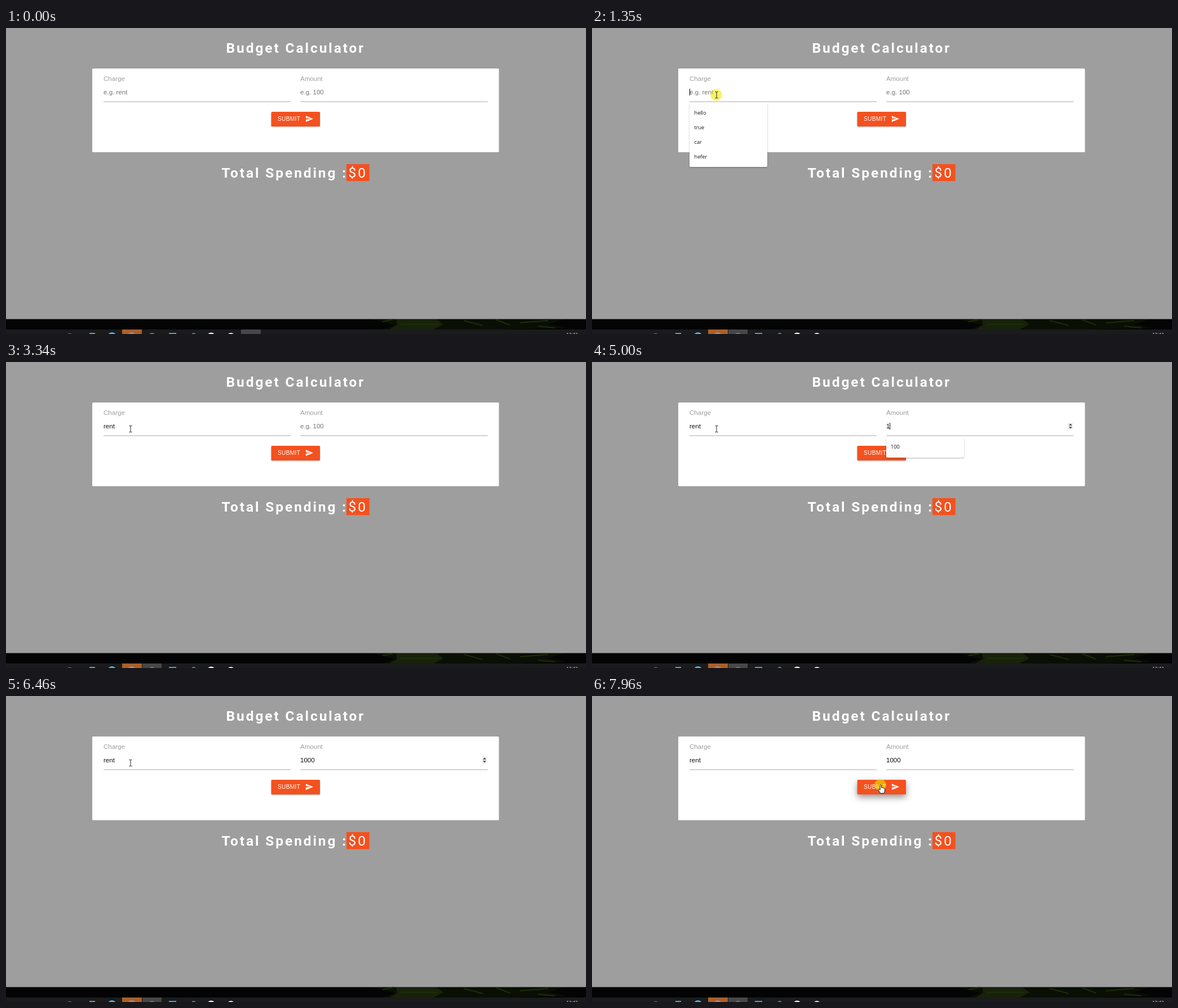
Recreate the animation shown at these times as an HTML page. Size 1029x544 px, loop 8000 ms.

```html
<!DOCTYPE html>
<html lang="en">
<head>
<meta charset="utf-8">
<title>Budget Calculator</title>
<style>
html, body { margin: 0; width: 100%; height: 100%; overflow: hidden; background: #9e9e9e; }
svg { display: block; width: 100%; height: 100%; }
text { font: 11.56px "Liberation Sans", Arial, sans-serif; white-space: pre; }
.head { font: 700 24.5px Roboto, sans-serif; letter-spacing: 2.89px; fill: #fff; }
.sum { font-weight: 400; }
.label { fill: #9e9e9e; }
.btn { font-size: 10.1px; letter-spacing: .36px; fill: #fff; }
.menu text { font: 9.1px "Open Sans", "Noto Sans", sans-serif; fill: #111; }
.menu rect { fill: #fff; filter: drop-shadow(0 1px 1px rgba(0,0,0,.3)); }
.clock { font: 8px "Open Sans", sans-serif; fill: #fff; }
</style>
</head>
<body>
<svg viewBox="0 0 1029 544">
  <rect width="1029" height="544" fill="#9e9e9e"/>

  <!-- desktop strip and taskbar -->
  <rect y="517.5" width="1029" height="27" fill="#040404"/>
  <path d="M650 518H990L960 527 996 533 880 536H668L690 528Z" fill="#0a0f05"/>
  <path d="M692 518H764L776 527 758 536H680L694 528Z" fill="#18220b"/>
  <path d="M668 522l20-4M700 527h66M812 520l34 9M868 518l26 10M912 524l50-4M944 530l30 3" stroke="#1d2c0a" stroke-width="2"/>
  <rect y="536" width="1029" height="8" fill="#1a1b1d"/>
  <rect x="206" y="536" width="35" height="8" fill="#ad5f28"/>
  <rect id="tabA" x="417" y="536" width="35" height="8" fill="#464748"/>
  <rect id="tabB" x="242" y="536" width="34" height="8" fill="#464748"/>
  <circle cx="113" cy="549" r="6.5" fill="#5d6a62"/>
  <rect x="148" y="542" width="10" height="2" fill="#4aa3d8"/>
  <circle cx="188" cy="549" r="8" fill="#4ab4e0"/>
  <circle cx="223" cy="549" r="8" fill="#8d8f9c"/>
  <circle cx="259" cy="549" r="7" fill="#a9683c"/>
  <rect x="289" y="542" width="13" height="2" fill="#3fa0e0"/>
  <circle cx="333" cy="546" r="4" fill="#3c8fc4"/>
  <circle cx="364" cy="549" r="7.5" fill="#eee"/>
  <circle cx="399" cy="549" r="7" fill="#eee"/>
  <text class="clock" x="994" y="546.5">12:42</text>

  <!-- page -->
  <text class="head" x="390.6" y="44">Budget Calculator</text>
  <rect x="153" y="72" width="721.5" height="148.7" rx="1.5" fill="#fff"/>
  <text class="label" x="173" y="94">Charge</text>
  <text class="label" x="522" y="94">Amount</text>
  <path d="M173 131H505M522.4 131H854.5" stroke="#9e9e9e" stroke-width=".9"/>
  <text id="charge" x="173" y="118"></text>
  <text id="amount" x="522" y="118"></text>
  <g id="spin">
    <rect x="844.5" y="108" width="8.5" height="12" fill="#eee"/>
    <path d="M846 112.7l2.9-3.2 2.9 3.2zM846 115.3l2.9 3.2 2.9-3.2z" fill="#444"/>
  </g>
  <rect id="caret" y="108" width="1" height="12"/>
  <rect id="button" x="470.6" y="149" width="86.4" height="26" rx="1.5" fill="#f4511e"/>
  <text class="btn" x="482" y="165.3">SUBMIT</text>
  <path transform="translate(530.7 154.1) scale(.62)" d="M2 21L23 12 2 3v7l15 2-15 2z" fill="#fff"/>
  <text class="head" x="382.5" y="266">Total Spending :</text>
  <rect x="604" y="242" width="40.7" height="30.2" fill="#f4511e"/>
  <text class="head sum" x="607.6" y="266">$0</text>

  <g id="menuA" class="menu">
    <rect x="173" y="134" width="138" height="113" rx="2"/>
    <text x="181.6" y="154.4">hello</text>
    <text x="181.6" y="180.3">true</text>
    <text x="181.6" y="206.2">car</text>
    <text x="181.6" y="232.1">hefer</text>
  </g>
  <g id="menuB" class="menu">
    <rect x="522" y="134" width="138" height="36" rx="2"/>
    <text x="530" y="154.4">100</text>
  </g>

  <!-- pointer -->
  <circle id="halo" r="10.3" fill="#f2e800" opacity=".58"/>
  <path id="arrow" d="M0 0V12.2L2.8 9.6 4.6 13.7 6.5 12.9 4.7 8.9H8.5Z" fill="#fff" stroke="#000" stroke-width=".8"/>
  <path id="beam" d="M-2.6-5.6H-.9L0-4.9 .9-5.6H2.6M0-4.9V4.9M-2.6 5.6H-.9L0 4.9 .9 5.6H2.6" fill="none" stroke="#222" stroke-width="1"/>
  <path id="hand" d="M-.9 .4Q.3-1 1.5 .4V4.9Q2.8 4 3.7 5.2 5 4.6 5.7 5.9 7.4 5.6 7.4 7.4V11L6 15H-.2L-4 9.6Q-4.6 7.6-2.6 7.9L-.9 9.3Z" fill="#fff" stroke="#000" stroke-width=".9"/>
</svg>
<script>
const LOOP = 8000, EM = 11.56;
const $ = id => document.getElementById(id);
const show = (id, on) => $(id).style.display = on ? "" : "none";
const clamp = v => Math.min(1, Math.max(0, v));
const within = (t, ...spans) => spans.some(([a, b]) => t >= a && t < b);
const glyph = { r: .333, e: .556, n: .556, t: .278 };
const widthOf = s => [...s].reduce((w, c) => w + (glyph[c] || .556) * EM, 0);

// number of keys pressed so far
const typed = (word, times, t) => word.slice(0, times.filter(k => t >= k).length);

function bezier(p, u) {
  const v = 1 - u, k = [v * v * v, 3 * v * v * u, 3 * v * u * u, u * u * u];
  return [0, 1].map(i => p.reduce((s, q, j) => s + q[i] * k[j], 0));
}
const smooth = u => u * u * (3 - 2 * u);

// twelve pointer samples between a and b
function travel(path, t, a, b, first) {
  const step = Math.min(11, Math.floor((t - a) / (b - a) * 11 + 1e-6));
  return bezier(path, smooth((step + first) / (11 + first)));
}
const toField = [[988, 538], [700, 420], [260, 45], [222, 118]];
const toButton = [[221, 119], [330, 130], [440, 222], [506, 172]];

function pointer(t) {
  if (t < 1000) return travel(toField, t, 190, 950, 0);
  if (t < 6730) return [221, 119];
  if (t < 7540) return travel(toButton, t, 6730, 7470, 1);
  return t < 7610 ? [510, 164] : t < 7750 ? [512, 159] : [512, 158];
}

function field(id, text, hint) {
  $(id).textContent = text || hint;
  $(id).setAttribute("fill", text ? "#111" : "#7a7272");
}

function menu(id, cx, cy, alpha) {
  show(id, alpha > 0);
  $(id).style.opacity = alpha;
  const s = alpha < 1 ? .986 : 1;
  $(id).setAttribute("transform", `translate(${cx * (1 - s)} ${cy * (1 - s)}) scale(${s})`);
}
const fade = (t, start) => {
  const d = t - start;
  return d < 80 ? 1 : d < 130 ? .74 : d < 210 ? .45 : d < 270 ? .15 : 0;
};

function draw(t) {
  const charge = typed("rent", [2270, 2350, 2610, 2880], t);
  const amount = typed("1000", [5000, 5270, 5600, 5930], t);
  field("charge", charge, "e.g. rent");
  field("amount", amount, "e.g. 100");

  const inAmount = t >= 4010;
  const end = inAmount ? 522 + widthOf(amount) : 173 + widthOf(charge);
  $("caret").setAttribute("x", Math.floor(end));
  show("caret", within(t, [1280, 1810], [2270, 3340], [3880, 4540], [5000, 6460], [6990, 7540]));
  show("spin", within(t, [4010, 7960]));

  menu("menuA", 242, 190, t < 1280 ? 0 : t < 1350 ? .6 : fade(t, 2270));
  menu("menuB", 591, 152, t < 5000 ? 0 : fade(t, 5600));
  show("tabA", t < 1140);
  show("tabB", t >= 1140);

  const lift = clamp((t - 7440) / 300);
  $("button").style.filter =
    `drop-shadow(0 ${1 + 4.2 * lift}px ${1 + 5 * lift}px rgba(0,0,0,${.3 + .12 * lift}))`;

  const [x, y] = pointer(t);
  const overField = x > 173 && x < 505 && y > 98 && y < 132;
  const overButton = x > 470 && x < 557 && y > 149 && y < 175;
  const shape = overField ? "beam" : overButton ? "hand" : "arrow";
  for (const id of ["arrow", "beam", "hand"]) {
    show(id, t >= 190 && id === shape);
    $(id).setAttribute("transform", `translate(${x} ${y})`);
  }
  show("halo", within(t, [1140, 1410], [7960, LOOP]));
  $("halo").setAttribute("transform", `translate(${x - .5} ${y})`);
}

const begin = performance.now();
function frame() {
  draw((performance.now() - begin) % LOOP);
  requestAnimationFrame(frame);
}
frame();
</script>
</body>
</html>
```
